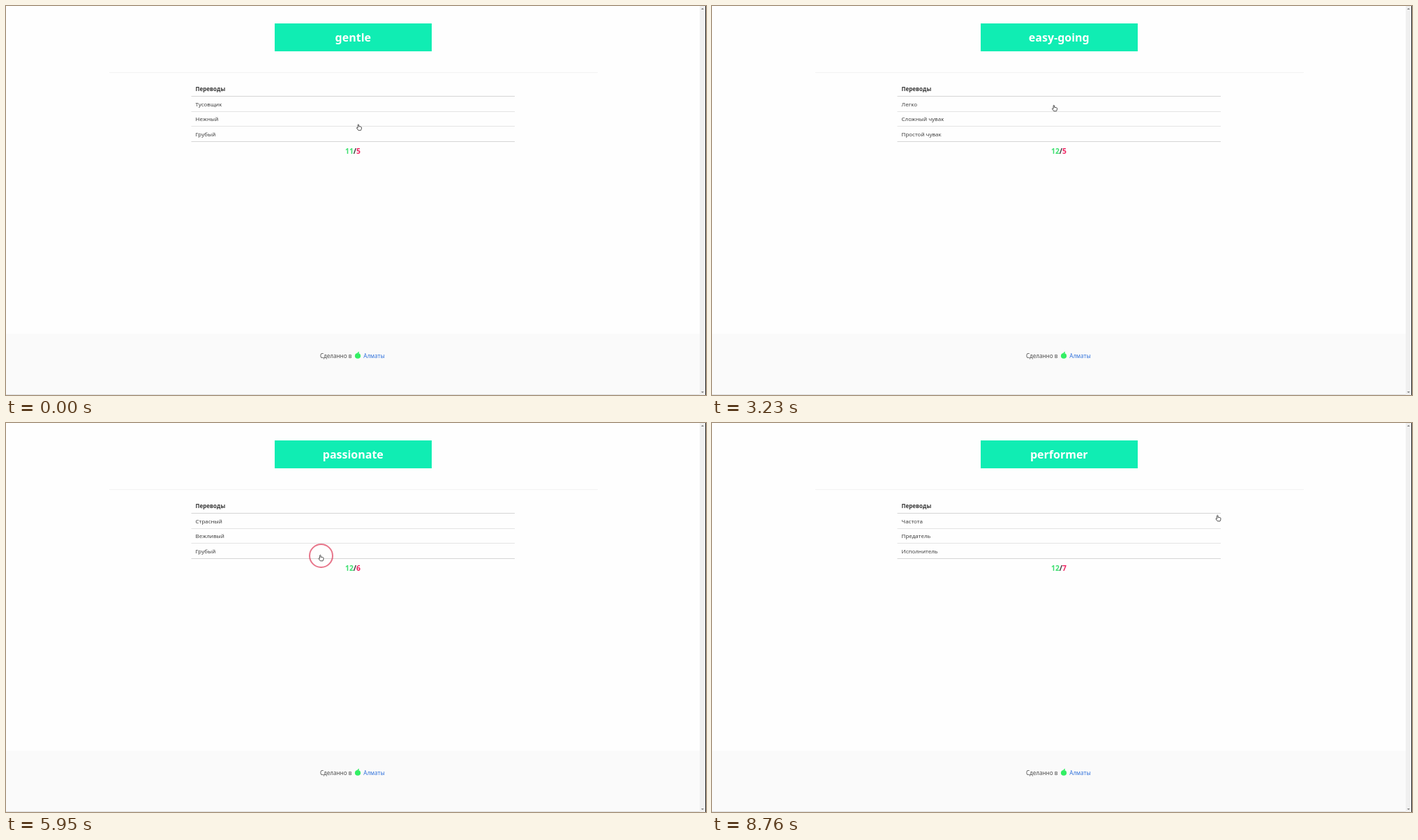
These frames come from a looping animation (1003x558 px, 8920 ms). An HTML page with a canvas:

```html
<!DOCTYPE html>
<html lang="ru">
<head>
<meta charset="utf-8">
<title>Переводы</title>
<style>
  html, body { margin: 0; width: 100%; height: 100%; overflow: hidden; background: #fefefe; }
  canvas { display: block; width: 1003px; height: 558px; }
</style>
</head>
<body>
<canvas id="stage"></canvas>
<script>
const W = 1003, H = 558, LOOP = 8920;
const FONT = '"Noto Sans", "Open Sans", sans-serif';
const GREEN = '#33ef64', RED = '#f02060', INK = '#404040';
const canvas = document.getElementById('stage');
const ctx = canvas.getContext('2d');
const dpr = window.devicePixelRatio || 1;
canvas.width = W * dpr;
canvas.height = H * dpr;

// Each card: when it shows, when it is answered, right and wrong rows.
const cards = [
  { at: 0, answer: 1050, word: 'gentle', rows: ['Тусовщик', 'Нежный', 'Грубый'], right: 1, before: [11, 5], after: [12, 5] },
  { at: 2080, answer: 4070, word: 'easy-going', rows: ['Легко', 'Сложный чувак', 'Простой чувак'], right: 2, wrong: 0, before: [12, 5], after: [12, 6] },
  { at: 5200, answer: 6760, word: 'passionate', rows: ['Страсный', 'Вежливый', 'Грубый'], right: 0, wrong: 2, before: [12, 6], after: [12, 7] },
  { at: 7880, answer: Infinity, word: 'performer', rows: ['Частота', 'Предатель', 'Исполнитель'], before: [12, 7] }
];

// Pointer: time, x, y; without a place it is hidden.
const moves = [
  [0, 506, 174], [100], [460, 497.5, 172], [890, 494, 167],
  [2870, 491.5, 159], [3040, 491.5, 149], [3230, 491, 146.5],
  [5060, 490.5, 155], [5200, 489, 163.5], [5360, 480.5, 176],
  [5510, 470.5, 183], [5650, 462.5, 189], [5800, 453.5, 193],
  [5950, 451.5, 193.5], [8760, 725.5, 136.5]
];

// Press rings: start, end, x, y.
const rings = [[1050, 1200, 494, 163.5], [4070, 4320, 490.5, 143.5], [5950, 6940, 451.5, 190.5]];

function box(x, y, w, h, color) {
  ctx.fillStyle = color;
  ctx.fillRect(x, y, w, h);
}

function text(s, x, y, size, color, weight = 400, align = 'left') {
  ctx.font = `${weight} ${size}px ${FONT}`;
  ctx.textAlign = align;
  ctx.fillStyle = color;
  ctx.fillText(s, x, y);
  return ctx.measureText(s).width;
}

function arrow(y, dir) {
  ctx.fillStyle = '#777';
  ctx.beginPath();
  ctx.moveTo(996, y + dir);
  ctx.lineTo(1000, y + dir);
  ctx.lineTo(998, y - dir);
  ctx.fill();
}

function fruit(x, y) {
  ctx.fillStyle = GREEN;
  ctx.beginPath();
  ctx.ellipse(x, y + 0.6, 4.1, 3.8, 0, 0, 7);
  ctx.fill();
  ctx.beginPath();
  ctx.ellipse(x + 0.8, y - 4.1, 1.5, 0.8, -0.7, 0, 7);
  ctx.fill();
}

function hand(x, y) {
  ctx.save();
  ctx.translate(x, y);
  ctx.beginPath();
  ctx.moveTo(-1.9, 0.8);
  ctx.lineTo(-1.9, -3.6);
  ctx.quadraticCurveTo(-1.1, -5, -0.4, -3.6);
  ctx.lineTo(-0.4, -1.2);
  ctx.quadraticCurveTo(2.9, -1.3, 3.5, 0);
  ctx.lineTo(3.3, 2.4);
  ctx.lineTo(2.5, 4.3);
  ctx.lineTo(-1.2, 4.3);
  ctx.lineTo(-3.6, 1);
  ctx.quadraticCurveTo(-3.4, -0.4, -1.9, 0.8);
  ctx.closePath();
  ctx.fillStyle = '#fff';
  ctx.fill();
  ctx.lineJoin = 'round';
  ctx.lineWidth = 0.85;
  ctx.strokeStyle = '#333';
  ctx.stroke();
  ctx.restore();
}

function ring(x, y) {
  ctx.beginPath();
  ctx.arc(x, y, 16.5, 0, 7);
  ctx.lineWidth = 2;
  ctx.strokeStyle = 'rgba(215, 20, 55, 0.58)';
  ctx.stroke();
}

function page() {
  box(0, 0, W, H, '#fefefe');
  box(148, 95, 700, 1, '#f3f3f3');
  box(0, 470, 994, 87, '#fafafa');
  box(0, 557, 994, 1, '#dedede');
  box(994, 0, 8, H, '#f0f0f0');
  box(1002, 0, 1, H, '#222');
  arrow(4, 1);
  arrow(554, -1);
  text('Сделанно в', 450, 504.6, 8.05, '#4a4a4a');
  fruit(504, 501.3);
  text('Алматы', 512.3, 504.6, 8.05, '#3273dc');
}

function table(card, done) {
  box(385, 25, 225, 40, '#10edb3');
  text(card.word, 497.3, 51, 16, '#fff', 700, 'center');
  text('Переводы', 271.6, 121.7, 8, '#363636', 700);
  box(265.5, 129, 463.5, 1, '#d6d6d6');
  box(265.5, 151, 463.5, 1, '#e4e4e4');
  box(265.5, 172, 463.5, 1, '#e4e4e4');
  box(265.5, 194, 463.5, 1, '#d6d6d6');
  card.rows.forEach((name, i) => {
    const y = 130 + i * 21.5;
    if (done && i === card.right) box(265.5, y, 463.5, 21, GREEN);
    if (done && i === card.wrong) box(265.5, y, 463.5, 21, RED);
    text(name, 271.6, y + 13.5, 7.95, INK);
  });
  const [good, bad] = done ? card.after : card.before;
  let x = 486;
  x += text(good, x, 211.6, 10.3, '#3fe071', 700);
  x += text('/', x, 211.6, 10.3, '#363636', 700);
  text(bad, x, 211.6, 10.3, RED, 700);
}

function draw(t) {
  ctx.setTransform(dpr, 0, 0, dpr, 0, 0);
  page();
  const card = cards.findLast(c => t >= c.at);
  table(card, t >= card.answer);
  for (const [from, to, x, y] of rings) if (t >= from && t < to) ring(x, y);
  const [, x, y] = moves.findLast(m => t >= m[0]);
  if (x !== undefined) hand(x, y);
}

const start = performance.now();
function tick(now) {
  draw(Math.max(0, now - start) % LOOP);
  requestAnimationFrame(tick);
}
draw(0);
requestAnimationFrame(tick);
</script>
</body>
</html>
```
